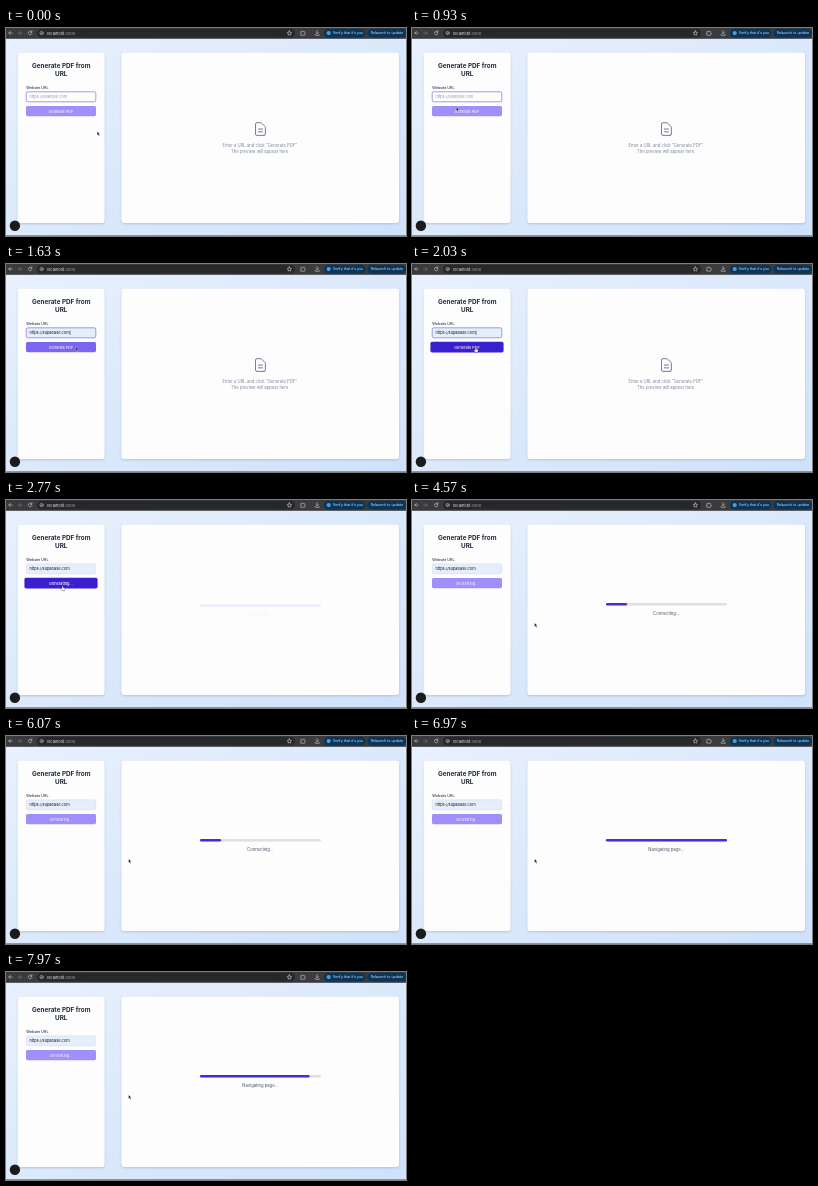
An HTML page that plays this animation: 400 px wide and 208 px high, repeating every 8 s.

```html
<!DOCTYPE html>
<html lang="en">
<head>
<meta charset="utf-8">
<title>Generate PDF from URL</title>
<style>
  html, body { margin: 0; width: 100%; height: 100%; overflow: hidden; }
  svg { display: block; width: 100%; height: 100%; font-family: Inter, Arial, sans-serif; }
  .mid { text-anchor: middle; }
  .line { fill: none; stroke-linecap: round; stroke-linejoin: round; }
</style>
</head>
<body>
<svg viewBox="0 0 400 208" preserveAspectRatio="none">
  <defs>
    <linearGradient id="sky" x1="0" y1="0" x2="1" y2="1">
      <stop offset="0" stop-color="#e9f1fc"/>
      <stop offset="1" stop-color="#cfe1fb"/>
    </linearGradient>
    <filter id="shadow" x="-10%" y="-10%" width="120%" height="120%">
      <feDropShadow dx="0" dy="1" stdDeviation="1.2" flood-color="#40587c" flood-opacity=".25"/>
    </filter>
  </defs>

  <rect width="400" height="208" fill="url(#sky)"/>
  <rect y="207.3" width="400" height=".7" fill="#69727f"/>

  <!-- browser toolbar -->
  <rect width="400" height="10.8" fill="#3a3b3d"/>
  <rect x="31" y=".8" width="258" height="8.6" rx="4.3" fill="#27282a"/>
  <g class="line" stroke="#c9cacc" stroke-width=".6">
    <path d="M6.3 5H2.8M4.4 3.4 2.8 5l1.6 1.6"/>
    <path d="M11.8 5h3.5M13.7 3.4 15.3 5l-1.6 1.6" stroke="#7c7d80"/>
    <path d="M25.8 4.2a1.8 1.8 0 1 0 .1 1.5M25.9 2.8v1.5h-1.5"/>
    <circle cx="35.6" cy="5" r="1.6"/>
    <path d="M35.6 5v.7"/>
    <path d="m283.4 2.8.7 1.5 1.6.2-1.2 1.1.3 1.6-1.4-.8-1.4.8.3-1.6-1.2-1.1 1.6-.2z"/>
    <path d="M295.2 3.7h1.1a.7.7 0 0 1 1.4 0h1v1.1a.7.7 0 0 1 0 1.4v1h-3.5z"/>
    <path d="M311.2 2.6v3M309.9 4.5l1.3 1.2 1.3-1.2M309.2 6.3v1h4v-1"/>
  </g>
  <text x="41" y="6.5" font-size="4" fill="#e8e8e9">localhost<tspan fill="#a9aaad">:3000</tspan></text>
  <g fill="#0b3558">
    <rect x="318" y=".8" width="41.5" height="8.6" rx="4.3"/>
    <rect x="361.5" y=".8" width="38.5" height="8.6" rx="4.3"/>
  </g>
  <circle cx="322.7" cy="5.1" r="2.1" fill="#4b9ce0"/>
  <g font-size="3.55" fill="#c5e3fb">
    <text x="326.8" y="6.4">Verify that it's you</text>
    <text x="364.7" y="6.4">Relaunch to update</text>
  </g>

  <!-- cards -->
  <g fill="#fdfdfe" filter="url(#shadow)">
    <rect x="11.8" y="24.8" width="86.7" height="170.2" rx="2.4"/>
    <rect x="115.5" y="24.8" width="277.5" height="170.2" rx="2.4"/>
  </g>

  <!-- form -->
  <g class="mid" font-size="6.35" font-weight="700" fill="#1e2939">
    <text x="55.2" y="39.8">Generate PDF from</text>
    <text x="55.2" y="48.3">URL</text>
  </g>
  <text x="20.3" y="60.8" font-size="3.65" font-weight="500" fill="#364153">Website URL</text>
  <rect id="field" x="20.2" y="63.8" width="69.6" height="10" rx="1.6"/>
  <text id="value" x="23.4" y="70.2" font-size="3.9"></text>
  <rect id="caret" x="60" y="66.6" width=".45" height="4.4" fill="#111"/>
  <g id="button">
    <rect id="buttonFace" x="20" y="78" width="70" height="10.2" rx="1.6"/>
    <text id="buttonLabel" class="mid" x="55" y="84.5" font-size="3.7" font-weight="500" fill="#fff"></text>
  </g>

  <!-- preview -->
  <g id="empty">
    <path class="line" transform="translate(246 92.6) scale(.704)" stroke="#707b91" stroke-width="1.4"
      d="M9 12h6M9 16h6M17 21H7a2 2 0 0 1-2-2V5a2 2 0 0 1 2-2h5.6l.7.3 5.4 5.4.3.7V19a2 2 0 0 1-2 2z"/>
    <g class="mid" font-size="4.2" fill="#7d879b">
      <text x="254.3" y="119">Enter a URL and click "Generate PDF".</text>
      <text x="254.3" y="125.3">The preview will appear here.</text>
    </g>
  </g>
  <g id="progress">
    <rect x="194" y="103" width="121" height="2.6" rx="1.3" fill="#dfe0e5"/>
    <rect id="bar" x="194" y="103" height="2.6" rx="1.3" fill="#432dde"/>
    <text id="status" class="mid" x="254.3" y="114.9" font-size="4.2" fill="#4a5565"></text>
  </g>

  <circle cx="8.9" cy="197.7" r="5.2" fill="#1b1b1c"/>

  <!-- pointers, each with its tip at the group origin -->
  <path id="arrow" d="M0 0v3.7l.9-.8.7 1.5.7-.3-.7-1.5h1.2z" fill="#000" stroke="#fff" stroke-width=".35"/>
  <path id="hand" d="M-.5-1.6q.5-.6 1 0v1.5l1.5.4q.6.3.4 1L2 3.1H-.6L-2 1.2q0-.7.6-.5l.9.6z"
    fill="#fff" stroke="#222" stroke-width=".35"/>
</svg>

<script>
const LOOP = 8000, FILLED = 1000, HOVER = 1500, CLICK = 2430, NEXT_STEP = 6930;
const el = Object.fromEntries([...document.querySelectorAll("svg [id]")].map(e => [e.id, e]));

const ramp = (t, start, end) => Math.min(1, Math.max(0, (t - start) / (end - start)));
const ease = p => p * p * (3 - 2 * p);
const mix = (a, b, p) => a + (b - a) * p;
const mixColor = (a, b, p) => `rgb(${a.map((v, i) => Math.round(mix(v, b[i], p)))})`;
const set = (node, attrs) => {
  for (const name in attrs) node.setAttribute(name, attrs[name]);
};

// [start, end, x, y]: pointer moves, each leaving from the previous stop
const moves = [
  [0, 0, 91.2, 103.6], [30, 630, 50, 69], [770, 960, 44, 80],
  [1080, 1570, 69.7, 83.2], [1750, 2350, 56.5, 87.6], [2830, 3210, 122.6, 123]
];
function pointerAt(t) {
  let [, , x, y] = moves[0];
  for (const [start, end, toX, toY] of moves.slice(1)) {
    const p = ease(ramp(t, start, end));
    x = mix(x, toX, p);
    y = mix(y, toY, p);
  }
  return [x, y];
}

function drawForm(t) {
  const filled = t >= FILLED, clicked = t >= CLICK;
  set(el.field, {
    fill: filled ? "#e4eefc" : "#fdfdfe",
    stroke: clicked ? "#cbd3df" : "#7476d8",
    "stroke-width": clicked ? .4 : .7
  });
  el.value.textContent = filled ? "https://supabase.com" : "https://example.com";
  set(el.value, { fill: filled ? "#15181d" : "#929aaa" });
  const textWidth = el.value.getComputedTextLength();
  set(el.caret, { x: 23.6 + textWidth, opacity: filled && !clicked ? 1 : 0 });

  const idle = [159, 143, 248], ready = [124, 102, 240], active = [58, 31, 207];
  const hover = ease(ramp(t, 1640, 1900)) * (1 - ease(ramp(t, 2850, 3050)));
  const scale = mix(1, 1.045, hover);
  const base = t >= HOVER && t < 2850 ? ready : idle;
  set(el.buttonFace, { fill: mixColor(base, active, hover) });
  set(el.button, { transform: `translate(55 83.1) scale(${scale}) translate(-55 -83.1)` });
  set(el.buttonLabel, { opacity: clicked ? mix(.8, 1, hover) : .9 });
  el.buttonLabel.textContent = clicked ? "Generating..." : "Generate PDF";
}

function drawPreview(t) {
  set(el.empty, { opacity: 1 - ramp(t, CLICK, CLICK + 270) });
  const fade = ramp(t, 2740, 3150);
  set(el.progress, { opacity: fade, transform: `translate(0 ${1.5 * (1 - ease(fade))})` });

  // the bar starts full on each step, then shrinks to that step's share
  const next = t >= NEXT_STEP;
  const share = next
    ? mix(1, .33, ease(ramp(t, 7740, 8720)))
    : mix(1, .174, ease(ramp(t, 3510, 4490)));
  set(el.bar, { width: 121 * share });
  el.status.textContent = next ? "Navigating page..." : "Connecting...";
}

function drawPointer(t) {
  const transform = `translate(${pointerAt(t)})`;
  const pointing = t >= 1700 && t < 2900;
  set(el.arrow, { transform, opacity: pointing ? 0 : 1 });
  set(el.hand, { transform, opacity: pointing ? 1 : 0 });
}

const begin = performance.now();
function frame() {
  const t = (performance.now() - begin) % LOOP;
  drawForm(t);
  drawPreview(t);
  drawPointer(t);
  requestAnimationFrame(frame);
}
frame();
</script>
</body>
</html>
```
